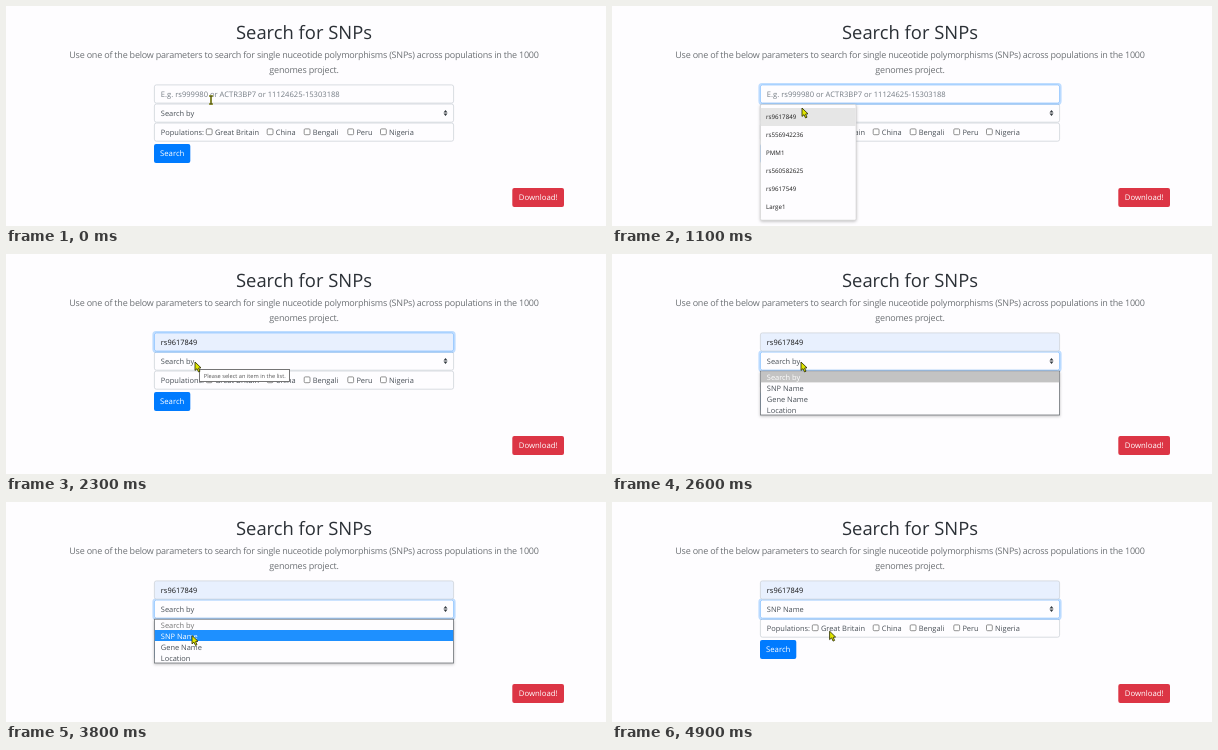
These frames come from a looping animation (600 by 220 pixels, 5000 ms). An HTML page:

```html
<!DOCTYPE html>
<html lang="en">
<head>
<meta charset="utf-8">
<title>Search for SNPs</title>
<style>
html, body { margin: 0; width: 100%; height: 100%; overflow: hidden; background: #fefdff; }
svg { display: block; width: 600px; height: 220px; }
text { font: 7.45px "Open Sans", "Noto Sans", sans-serif; fill: #495057; text-rendering: geometricPrecision; white-space: pre; }
.title { font-size: 18.4px; fill: #2b3036; text-anchor: middle; }
.lead { font-size: 9px; letter-spacing: -.21px; fill: #6d7175; text-anchor: middle; }
.button { font-size: 7.75px; font-weight: 500; fill: #fff; text-anchor: middle; }
.hint { font-size: 7.6px; fill: #747c84; }
.item { font-size: 6.2px; font-weight: 500; fill: #1c1c1c; }
.tip { font-size: 5.65px; fill: #575757; }
.field { fill: #fefdff; stroke: #ced4da; stroke-width: .8; }
.ring { fill: none; stroke: #007bff; stroke-opacity: .25; stroke-width: 1.6; }
.check { fill: #fff; stroke: #767676; stroke-width: .8; }
.shadow { filter: drop-shadow(0 1px 1.5px rgba(0, 0, 0, .25)); }
</style>
</head>
<body>
<svg viewBox="0 0 600 220">
  <text class="title" x="298" y="33.3">Search for SNPs</text>
  <text class="lead" x="298" y="52.4">Use one of the below parameters to search for single nuceotide polymorphisms (SNPs) across populations in the 1000</text>
  <text class="lead" x="298" y="66.7">genomes project.</text>

  <rect class="field" x="148.4" y="117" width="299.2" height="18.2" rx="2"/>
  <g id="places"><text x="154.8" y="128.9">Populations:</text></g>

  <rect id="selectRing" class="ring" x="147.2" y="97" width="301.6" height="20.2" rx="2.8"/>
  <rect id="select" class="field" x="148.4" y="98" width="299.2" height="18.2" rx="2"/>
  <text id="choice" x="154.8" y="109.8">Search by</text>
  <path fill="#343a40" d="M437.5 106.4l2-2.5 2 2.5zM437.5 107.6l2 2.5 2-2.5z"/>

  <rect id="inputRing" class="ring" x="147.2" y="77.9" width="301.6" height="20.2" rx="2.8"/>
  <rect id="input" class="field" x="148.4" y="78.9" width="299.2" height="18.2" rx="2"/>
  <text id="hint" class="hint" x="154.8" y="90.9">E.g. rs999980 or ACTR3BP7 or 11124625-15303188</text>
  <text id="value" x="154.8" y="90.9" style="fill:#151515">rs9617849</text>
  <rect id="caret" y="83.5" width=".8" height="9.5" fill="#222"/>

  <rect x="148" y="138" width="36.3" height="19" rx="2" fill="#007bff"/>
  <text class="button" x="166.2" y="150.2">Search</text>
  <rect x="506.3" y="182" width="51.7" height="19" rx="2" fill="#dc3545"/>
  <text class="button" x="532.2" y="194.3">Download!</text>

  <g id="history">
    <rect class="shadow" x="148.4" y="98.4" width="95.7" height="115.8" rx="1.5" fill="#fefdff" stroke="#d2d2d2" stroke-width=".7"/>
    <rect id="hover" x="148.8" y="102" width="95" height="18" fill="#e6e6e6"/>
  </g>

  <g id="list">
    <rect class="shadow" x="148.4" y="117.2" width="299.2" height="43.8" fill="#fefdff" stroke="#70757a" stroke-width=".8"/>
    <rect id="mark" x="148.8" width="298.4" height="11"/>
  </g>

  <g id="tooltip">
    <rect x="193.5" y="115.5" width="90" height="12" fill="#fff" stroke="#686868" stroke-width=".9"/>
    <text class="tip" x="197.8" y="123.7">Please select an item in the list.</text>
  </g>

  <g id="beam" fill="none">
    <path d="M-1.8-4h3.6M0-4v8M-1.8 4h3.6" stroke="#d9dc4a" stroke-width="2"/>
    <path d="M-1.8-4h3.6M0-4v8M-1.8 4h3.6" stroke="#33351c"/>
  </g>
  <path id="arrow" d="M0 0V8.4L2 6.7 3.5 9.9 5 9.2 3.6 6.1 6 5.8Z" fill="#dfe500" stroke="#2e3005" stroke-width=".85" stroke-linejoin="round"/>
</svg>
<script>
const $ = id => document.getElementById(id);
const show = (id, on) => $(id).setAttribute("visibility", on ? "visible" : "hidden");
const add = (parent, tag, attrs, label = "") => {
  const el = document.createElementNS("http://www.w3.org/2000/svg", tag);
  for (const key in attrs) el.setAttribute(key, attrs[key]);
  el.textContent = label;
  return $(parent).appendChild(el);
};

[["Great Britain", 200.3], ["China", 261.2], ["Bengali", 298.2], ["Peru", 341.8], ["Nigeria", 374.5]].forEach(([name, x]) => {
  add("places", "rect", { class: "check", x, y: 122.9, width: 5.8, height: 5.8, rx: 1 });
  add("places", "text", { x: x + 8.6, y: 128.9 }, name);
});
["rs9617849", "rs556942236", "PMM1", "rs560582625", "rs9617549", "Large1"].forEach((name, i) =>
  add("history", "text", { class: "item", x: 154, y: 113.4 + 18 * i }, name));
const options = ["Search by", "SNP Name", "Gene Name", "Location"].map((name, i) =>
  add("list", "text", { x: 154.8, y: 125.6 + 11 * i }, name));

// Pointer stops: time, x, y
const stops = [[0, 205, 94], [600, 205, 94], [1000, 190, 102], [1300, 190, 102], [1500, 189, 108],
  [2800, 189, 108], [3300, 188, 126], [3400, 187, 132], [3700, 186, 133.5], [4200, 186, 133.5],
  [4500, 200, 124], [4800, 215, 128.7], [4900, 217.6, 129.2], [5000, 217.6, 129.2]];

function pointer(t) {
  const i = stops.findIndex(s => s[0] > t);
  const [t0, x0, y0] = stops[i - 1], [t1, x1, y1] = stops[i];
  const k = (t - t0) / (t1 - t0);
  return [x0 + (x1 - x0) * k, y0 + (y1 - y0) * k];
}

const ramp = (t, from, length) => Math.min(1, Math.max(0, (t - from) / length));

function focus(id, amount) {
  $(id + "Ring").setAttribute("opacity", amount);
  $(id).style.stroke = amount > .5 ? "#80bdff" : "#ced4da";
}

function draw(t) {
  const filled = t >= 1200, picked = t >= 3900, onName = t >= 3400;
  focus("input", ramp(t, 100, 200) - ramp(t, 2400, 200));
  focus("select", ramp(t, 2400, 200));
  $("input").style.fill = filled ? "#e8f0fe" : "#fefdff";
  show("hint", !filled);
  show("value", filled);
  $("caret").setAttribute("x", filled ? 190.9 : 154.8);
  show("caret", (t >= 200 && t < 700) || (t >= 1500 && t < 2000));

  const fade = ramp(t, 1500, 260);
  show("history", t >= 400 && fade < 1);
  $("history").setAttribute("opacity", 1 - fade);
  $("history").setAttribute("transform", fade ? "translate(.8 1)" : "");
  show("tooltip", t >= 2300 && t < 2500);

  $("list").style.display = t >= 2600 && !picked ? "" : "none";
  $("mark").setAttribute("y", onName ? 128 : 117.4);
  $("mark").setAttribute("fill", onName ? "#1e90ff" : "#c3c3c3");
  options[0].style.fill = onName ? "#757575" : "#fff";
  options[1].style.fill = onName ? "#fff" : "#495057";
  $("choice").textContent = picked ? "SNP Name" : "Search by";

  const [x, y] = pointer(t), text = t < 1000 && y < 99;
  $("hover").style.display = t >= 900 ? "" : "none";
  show("beam", text);
  show("arrow", !text);
  for (const id of ["beam", "arrow"]) $(id).setAttribute("transform", `translate(${x} ${y})`);
}

const start = performance.now();
function tick() {
  const t = (performance.now() - start) % 5000;
  draw(Math.floor(t / 100) * 100);
  requestAnimationFrame(tick);
}
tick();
</script>
</body>
</html>
```
